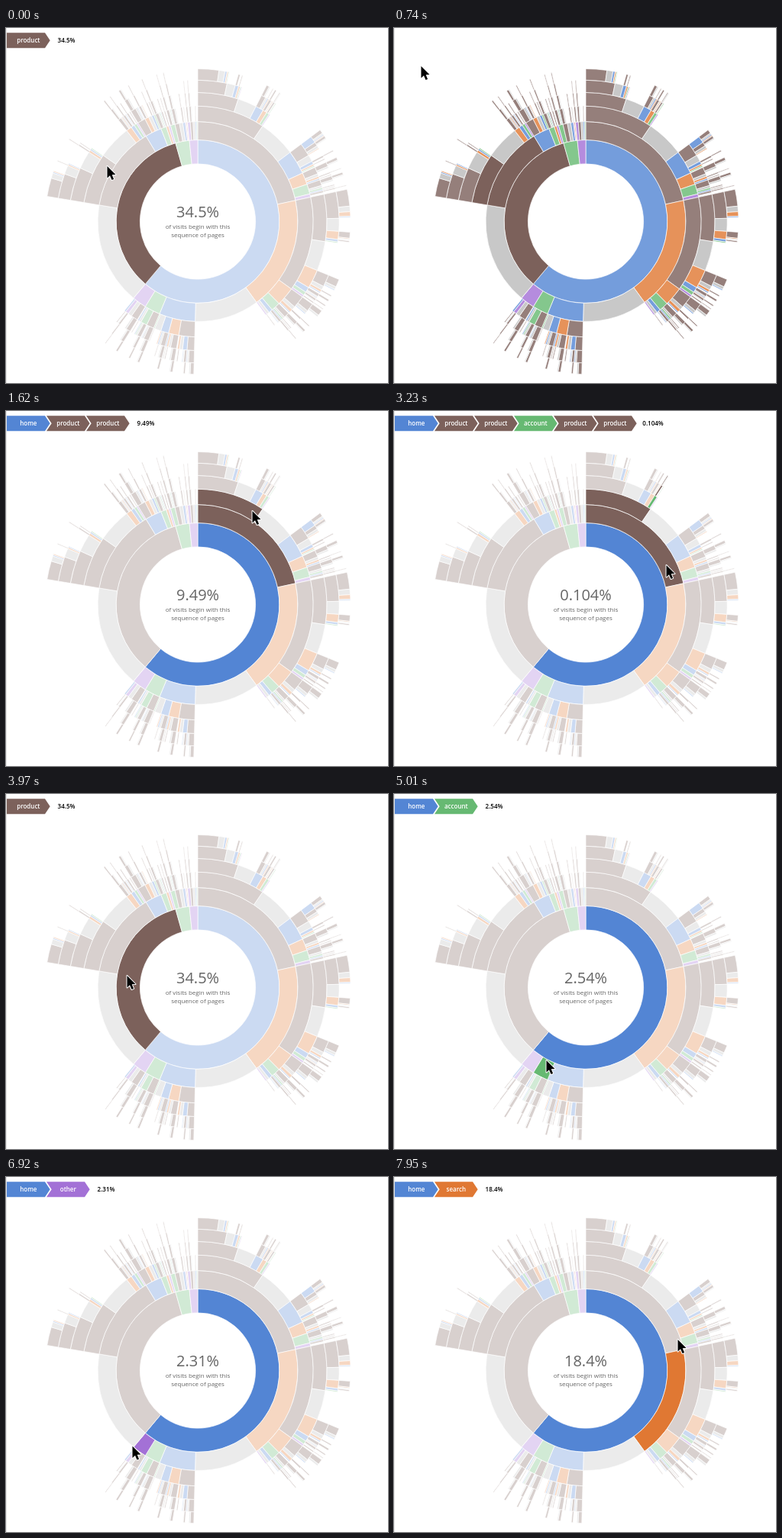
Recreate the animation shown at these times as an HTML page with a canvas. Size 500 by 465 pixels, loop 8 s.

```html
<!DOCTYPE html>
<html lang="en">
<head>
<meta charset="utf-8">
<title>Visit sequences</title>
<style>
  html, body { margin: 0; width: 100%; height: 100%; overflow: hidden; background: #fff; }
  canvas { display: block; }
</style>
</head>
<body>
<canvas id="stage" width="500" height="465"></canvas>
<script>
const ctx = document.getElementById('stage').getContext('2d');
const LOOP = 8000, TICK = 146.6;
const CX = 251, CY = 253.5, RADIUS = 200, LEVELS = 7;
const MIN_WIDTH = 0.286; // degrees
const FONT = '"Open Sans", "Noto Sans", sans-serif';

const PAGES = {
  h: { name: 'home', rgb: [83, 133, 212] },
  p: { name: 'product', rgb: [124, 97, 91] },
  s: { name: 'search', rgb: [224, 120, 51] },
  a: { name: 'account', rgb: [102, 185, 114] },
  o: { name: 'other', rgb: [163, 113, 214] },
  e: { name: 'end', rgb: [187, 187, 187] }
};

// Widths in degrees of the pages that follow a sequence.
const NEXT = {
  '': 'h220 p124.2 a9.9 o5.9',
  h: 'p77.8 s66.2 e37.5 h21 a9.14 o8.3',
  hp: 'p34.16 e19 h12 s6 a5 o1.6',
  hpp: 'p18.3 e8.5 h3.6 s1.9 a1.3 o.5',
  hppp: 'p12 e3.4 h1.4 s.7 a.5 o.3',
  hpppp: 'p8 e2.3 h.8 s.5 a.3',
  hppa: 'p.7 e.3 a.3',
  hppap: 'p.374 e.3',
  hph: 'p6 e3 h1.4 s.8 a.5',
  hphp: 'h2.8 p1.6 e1.1 s.4',
  hs: 'p48 s9.5 a4.6 h2 e1.4 o.7',
  hsp: 'p21.2 e13.3 s8.5 h2.4 a1.6 o1',
  hspp: 'p10.9 e5.3 s3.3 h1 a.5',
  hsppp: 'p6.4 e2.1 s1.7 h.4',
  hspps: 'p2.3 s.4 e.3',
  hsps: 'p5 e1.6 s1 h.5',
  hss: 'p5.6 e1.6 s1.4 h.5',
  hh: 'p8 s5.2 h4 e3.2 a.6',
  hhp: 'p3.3 h2 e1.4 s.9',
  hhpp: 'p2.3 e.6 h.4',
  ha: 'p3.8 a3.2 e1.1 h.7',
  ho: 'p3.4 e2 o1.6 h.8',
  p: 'e59.5 p49.3 h9.6 a3.2 s1.4 o1.2',
  pp: 'p25.5 e17 s2.8 h1.8 a1.4 o.8',
  ppp: 'p15 e8 s1.1 h.7 a.5',
  pppp: 'p10.2 e3.6 s.6 h.4',
  ppppp: 'p7 e2 h.5 s.4',
  ph: 'p4 s2 e1.6 h1.2 a.8',
  a: 'a2.6 p2.6 e2 h1.4 o.6 s.5',
  o: 'o1.6 p1.6 e1.3 h.8 a.5'
};

// Pointer stops: tick, x, y.
const TRACK = [
  [0, 132, 181], [1, 108, 148], [3, 48, 66], [5, 35, 50], [6, 70, 78],
  [8, 190, 168], [9, 190, 168], [10, 268, 160], [11, 322, 131], [14, 346, 102],
  [16, 352, 90], [20, 352, 90], [22, 356, 202], [23, 340, 225], [26, 168, 240],
  [27, 158, 238], [31, 158, 238], [33, 180, 315], [34, 199, 349], [35, 199, 349],
  [36, 185, 362], [38, 80, 408], [41, 18, 425], [44, 18, 425], [46, 110, 385],
  [48, 220, 320], [50, 345, 215], [52, 366, 208], [53, 372, 232], [54, 371, 213]
];

// Lit sequence from a tick on; a third value is the time the pointer left the chart.
const HOVER = [
  [0, 'p'], [1, 'ppp', 145], [8, 'p'], [10, 'h'], [11, 'hpp'], [12, 'hppa'],
  [14, 'hppap'], [15, 'hppapp'], [23, 'hp'], [24, 'h'], [26, 'p'], [34, 'ha'],
  [37, 'ha', 5430], [47, 'ho'], [48, 'h'], [51, 'hp'], [53, 'hs']
];

const nodes = [];
const widths = {};

function children(path, width) {
  const spec = NEXT[path];
  if (spec) return spec.split(' ').map(s => [s[0], +s.slice(1)]);
  const own = path.slice(-1);
  const shares = own === 'p'
    ? [['p', 0.6], ['e', 0.22], ['h', 0.08], ['s', 0.05], ['a', 0.05]]
    : [['p', 0.52], ['e', 0.2], [own, 0.16], [own === 'h' ? 's' : 'h', 0.12]];
  return shares.map(([key, share]) => [key, share * width]);
}

function build(path, start, width) {
  if (path.length >= LEVELS - 1 || path.endsWith('e')) return;
  let at = start;
  for (const [key, w] of children(path, width)) {
    const id = path + key;
    if (w > MIN_WIDTH) {
      nodes.push({ id, key, from: at, to: at + w, depth: id.length });
      widths[id] = w;
      build(id, at, w);
    }
    at += w;
  }
}
build('', 0, 360);

const ring = level => RADIUS * Math.sqrt(level / LEVELS);
const turn = deg => (deg - 90) * Math.PI / 180;
const onWhite = (rgb, alpha) =>
  `rgb(${rgb.map(c => Math.round(255 - (255 - c) * alpha)).join()})`;

function ease(t) {
  t = Math.min(1, Math.max(0, t));
  return t < 0.5 ? 4 * t ** 3 : 1 - 4 * (1 - t) ** 3;
}

function drawChart(lit, alpha) {
  ctx.strokeStyle = '#fff';
  ctx.lineWidth = 0.67;
  for (const n of nodes) {
    const a = turn(n.from), b = turn(n.to);
    ctx.beginPath();
    ctx.arc(CX, CY, ring(n.depth + 1), a, b);
    ctx.arc(CX, CY, ring(n.depth), b, a, true);
    ctx.closePath();
    ctx.fillStyle = onWhite(PAGES[n.key].rgb, lit.startsWith(n.id) ? 1 : alpha);
    ctx.fill();
    ctx.stroke();
  }
}

function label(text, x, y, size, color, weight = 400) {
  ctx.font = `${weight} ${size}px ${FONT}`;
  ctx.fillStyle = color;
  ctx.fillText(text, x, y);
}

function polygon(points) {
  ctx.beginPath();
  points.forEach(([x, y]) => ctx.lineTo(x, y));
  ctx.closePath();
}

function drawTrail(lit, percent) {
  const w = 50, h = 20, gap = 2, tip = 20 / 3, top = 6.3;
  [...lit].forEach((key, i) => {
    const x = 1 + i * (w + gap);
    const points = [[x, top], [x + w, top], [x + w + tip, top + h / 2], [x + w, top + h], [x, top + h]];
    if (i) points.push([x + tip, top + h / 2]);
    polygon(points);
    ctx.fillStyle = onWhite(PAGES[key].rgb, 1);
    ctx.fill();
    label(PAGES[key].name, x + (w + tip) / 2, 19.2, 8, '#fff', 600);
  });
  label(percent, 1 + (lit.length + 0.5) * (w + gap), 19.2, 8, '#000', 600);
}

function drawSummary(percent) {
  label(percent, CX, 247.8, 20, '#666');
  label('of visits begin with this', CX, 262.8, 8, '#666');
  label('sequence of pages', CX, 274, 8, '#666');
}

function pointerAt(tick) {
  const i = TRACK.findIndex(k => k[0] >= tick);
  if (i <= 0) return TRACK[i < 0 ? TRACK.length - 1 : 0].slice(1);
  const [t0, x0, y0] = TRACK[i - 1], [t1, x1, y1] = TRACK[i];
  const f = (tick - t0) / (t1 - t0);
  return [x0 + (x1 - x0) * f, y0 + (y1 - y0) * f];
}

function drawPointer([x, y]) {
  ctx.save();
  ctx.translate(x + 0.5, y);
  polygon([[0, 0], [0, 15.5], [3.5, 12.3], [6, 18], [8.6, 16.9], [6.2, 11.3], [11, 11.1]]);
  ctx.lineJoin = 'round';
  ctx.lineWidth = 2;
  ctx.strokeStyle = '#fff';
  ctx.stroke();
  ctx.fillStyle = '#000';
  ctx.fill();
  ctx.restore();
}

function draw(time) {
  const tick = Math.floor(time / TICK);
  const [, lit, left] = HOVER.filter(k => k[0] <= tick).pop();
  const away = left !== undefined;
  const alpha = away ? 0.3 + 0.7 * ease((tick * 147 - left) / 1000) : 0.3;

  ctx.fillStyle = '#fff';
  ctx.fillRect(0, 0, 500, 465);
  ctx.fillStyle = '#e6e6e6';
  ctx.fillRect(0, 0, 1, 465);
  ctx.textAlign = 'center';
  drawChart(lit, alpha);
  if (!away) {
    const percent = (widths[lit] / 3.6).toPrecision(3) + '%';
    drawTrail(lit, percent);
    drawSummary(percent);
  }
  drawPointer(pointerAt(tick));
}

const begin = performance.now();
function loop() {
  draw((performance.now() - begin) % LOOP);
  requestAnimationFrame(loop);
}
loop();
</script>
</body>
</html>
```
